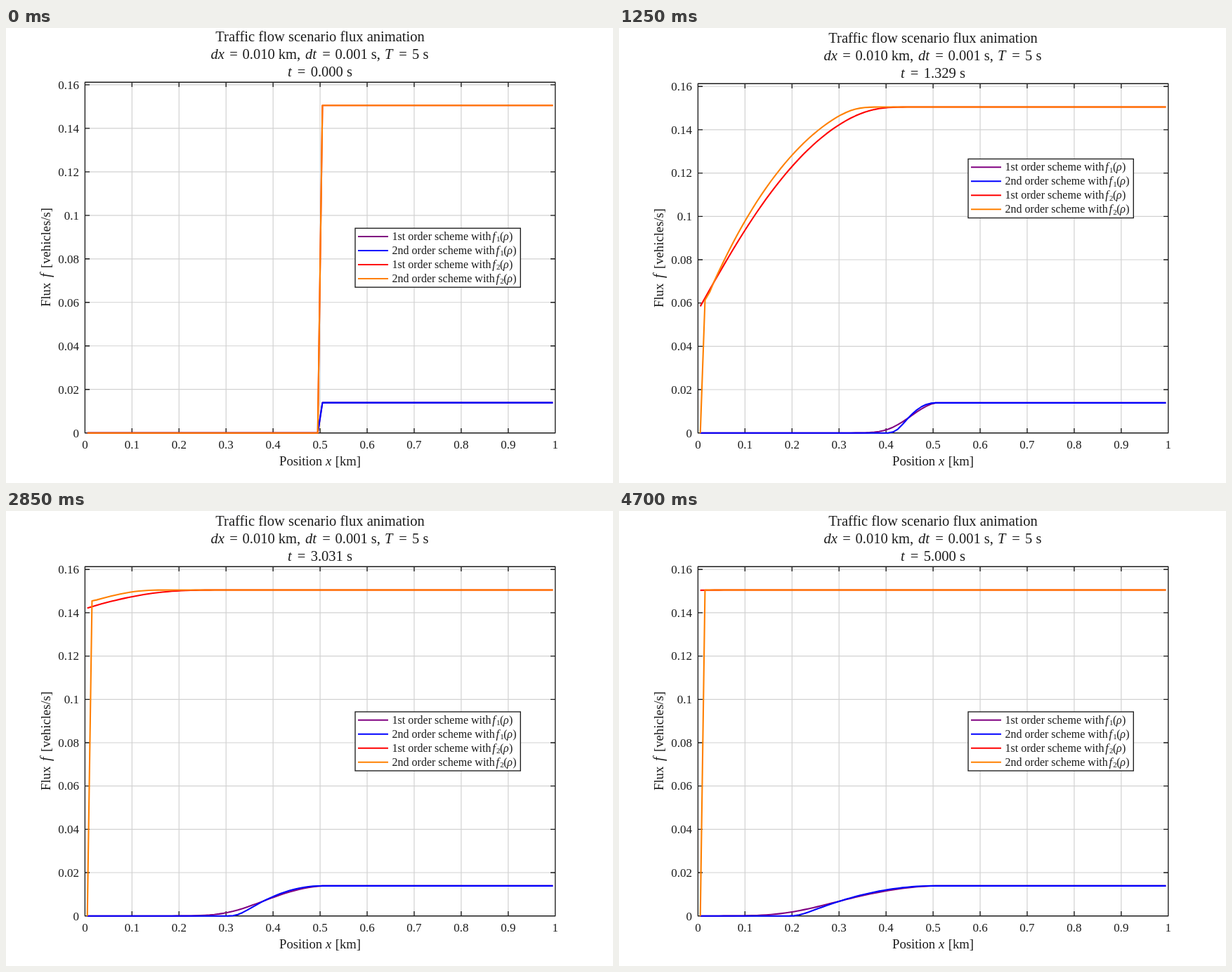
These frames come from a looping animation (864x648 px, 4750 ms). An HTML page:

```html
<!DOCTYPE html>
<html lang="en">
<head>
<meta charset="utf-8">
<title>Traffic flow flux</title>
<style>
  html, body { margin: 0; width: 100%; height: 100%; overflow: hidden; background: #fff; }
  svg { display: block; width: 864px; height: 648px; }
  text { font-family: "Liberation Serif", "Times New Roman", serif; fill: #1c1c1c; white-space: pre; }
  .i { font-style: italic; }
</style>
</head>
<body>
<svg id="stage" viewBox="0 0 864 648"></svg>
<script>
const FRAMES = 95, FRAME_MS = 50;
const CELLS = 100, DX = 0.01, DT = 0.001, STEPS = 5000;
const LEFT = 112.4, RIGHT = 781.8, BOTTOM = 576.7;
const INK = '#1c1c1c';

// Flux laws: parabolic and logarithmic
const flux1 = r => r * (1 - r) / 18;
const flux2 = r => -r * Math.log10(r);

const vanLeer = (a, b) => a * b > 0 ? 2 * a * b / (a + b) : 0;

// All waves run to the left, so each face takes the value of its right cell
function rate(rho, f, second) {
  const face = rho.map((r, i) => {
    if (!second || i === 0 || i === CELLS - 1) return f(r);
    return f(r - vanLeer(r - rho[i - 1], rho[i + 1] - r) / 2);
  });
  return rho.map((r, i) =>
    i === CELLS - 1 || (second && i === 0) ? 0 : (face[i] - face[i + 1]) / DX);
}

const stepOf = k => Math.floor(STEPS * k / (FRAMES - 1));

function simulate(f, second) {
  let rho = Float64Array.from({ length: CELLS }, (_, i) => i < CELLS / 2 ? 1 : 0.5);
  const shots = [];
  for (let n = 0; n <= STEPS; n++) {
    if (n === stepOf(shots.length)) shots.push(rho.map(f));
    const a = rate(rho, f, second);
    const next = rho.map((r, i) => r + DT * a[i]);
    if (second) {
      const b = rate(next, f, true);
      rho = rho.map((r, i) => r + DT * (a[i] + b[i]) / 2);
    } else {
      rho = next;
    }
  }
  return shots;
}

const series = [
  { color: '#800080', order: '1st', law: 1, shots: simulate(flux1, false) },
  { color: '#0000ff', order: '2nd', law: 1, shots: simulate(flux1, true) },
  { color: '#ff0000', order: '1st', law: 2, shots: simulate(flux2, false) },
  { color: '#ff8000', order: '2nd', law: 2, shots: simulate(flux2, true) }
];

const text = (x, y, size, str, anchor = 'start', cls = '') =>
  `<text x="${x}" y="${y}" font-size="${size}" text-anchor="${anchor}" class="${cls}">${str}</text>`;
const path = (d, color, width) =>
  `<path d="${d}" fill="none" stroke="${color}" stroke-width="${width}" stroke-linejoin="round"/>`;
const px = x => LEFT + x * (RIGHT - LEFT);

function layoutAt(k) {
  if (k === 0) return { shift: 0, top: 77.2, unit: 3099, legend: 285.2 };
  return { shift: 2, top: 79.2, unit: 3084, legend: k < 50 ? 186.5 : 286 };
}

function title(k, shift) {
  const size = 20.53, y2 = 43.5, y3 = 68.5;
  const eq = (x, y) => text(x, y, size, '=', 'middle');
  const it = (x, y, s) => text(x, y, size, s, 'start', 'i');
  const up = (x, y, s) => text(x, y, size, s);
  const time = (stepOf(k) / 1000).toFixed(3);
  return `<g transform="translate(0 ${shift})">` +
    text(447, 18.5, size, 'Traffic flow scenario flux animation', 'middle') +
    it(291.5, y2, 'dx') + eq(324, y2) + up(336.5, y2, '0.010 km,') +
    it(426, y2, 'dt') + eq(456, y2) + up(468.5, y2, '0.001 s,') +
    it(539, y2, 'T') + eq(565, y2) + up(578, y2, '5 s') +
    it(401, y3, 't') + eq(420.5, y3) + up(433.7, y3, time + ' s') + '</g>';
}

function axes(top, unit) {
  const size = 17, tick = 6.7;
  let grid = '', ticks = '', labels = '';
  for (let i = 0; i <= 10; i++) {
    const x = px(i / 10);
    if (i % 10) grid += `M${x} ${top}V${BOTTOM}`;
    ticks += `M${x} ${BOTTOM}v${-tick}M${x} ${top}v${tick}`;
    labels += text(x, 599, size, String(i / 10), 'middle');
  }
  for (let i = 0; i <= 8; i++) {
    const y = BOTTOM - i * 0.02 * unit;
    if (i) grid += `M${LEFT} ${y}H${RIGHT}`;
    ticks += `M${LEFT} ${y}h${tick}M${RIGHT} ${y}h${-tick}`;
    labels += text(104, y + 5.8, size, String(i * 2 / 100), 'end');
  }
  const box = `M${LEFT} ${top}H${RIGHT}V${BOTTOM}H${LEFT}Z`;
  const mid = (top + BOTTOM) / 2;
  const side = text(-70, 0, 18.67, 'Flux') + text(-28, 0, 20, 'f', 'start', 'i') +
    text(71, 0, 18.67, '[vehicles/s]', 'end');
  return path(grid, '#d2d2d2', 1.2) + path(box + ticks, INK, 1.35) + labels +
    text(389, 623, 18.67, 'Position') + text(455, 623, 18.67, 'x', 'start', 'i') +
    text(505, 623, 18.67, '[km]', 'end') +
    `<g transform="translate(63 ${mid}) rotate(-90)">${side}</g>`;
}

function curve(values, color, unit) {
  let d = '';
  values.forEach((v, i) => {
    d += (i ? 'L' : 'M') + px((i + 0.5) * DX).toFixed(2) + ' ' + (BOTTOM - v * unit).toFixed(2);
  });
  return path(d, color, 2.1);
}

function legend(top) {
  let out = `<rect x="497" y="${top}" width="235.3" height="84" fill="#fff" stroke="${INK}" stroke-width="1.35"/>`;
  series.forEach((s, i) => {
    const y = top + 11.8 + 20 * i, base = y + 4.8;
    const x = s.order === '1st' ? 692.3 : 697.6;
    out += path(`M501 ${y}H544`, s.color, 2.1) +
      text(549.6, base, 16, s.order + ' order scheme with') +
      text(x, base, 16.5, 'f', 'start', 'i') + text(x + 5.6, base + 2.6, 11, s.law) +
      text(x + 10.6, base, 16, '(') + text(x + 15.6, base, 16, 'ρ', 'start', 'i') +
      text(x + 23.6, base, 16, ')');
  });
  return out;
}

const stage = document.getElementById('stage');
let shown = -1;

function draw(k) {
  if (k === shown) return;
  shown = k;
  const { shift, top, unit, legend: legendTop } = layoutAt(k);
  stage.innerHTML = title(k, shift) + axes(top, unit) +
    series.map(s => curve(s.shots[k], s.color, unit)).join('') + legend(legendTop);
}

const start = performance.now();
function tick() {
  const t = (performance.now() - start) % (FRAMES * FRAME_MS);
  draw(Math.floor(t / FRAME_MS));
  requestAnimationFrame(tick);
}
tick();
</script>
</body>
</html>
```
